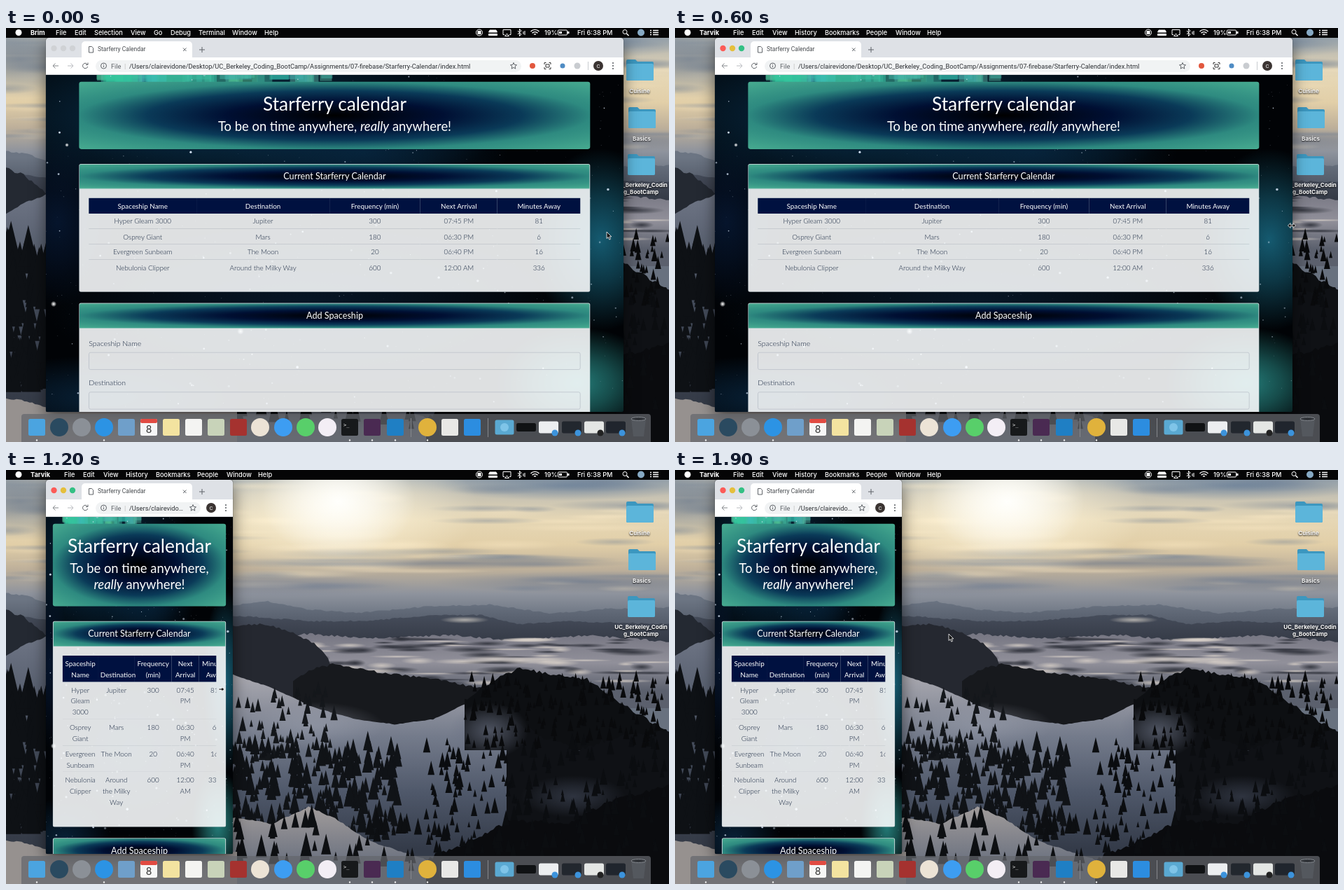
An HTML page with a canvas for the animation above (2 s loop, 947x591 px).

```html
<!DOCTYPE html>
<html lang="en">
<head>
<meta charset="utf-8">
<title>Starferry Calendar</title>
<style>
html, body { margin: 0; width: 100%; height: 100%; overflow: hidden; background: #0b0c0e; }
#stage { position: relative; width: 947px; height: 591px; overflow: hidden; font-family: Roboto, sans-serif; }
#stage > *, #win > *, .abs { position: absolute; }
canvas { display: block; }

#bar { left: 0; top: 0; width: 947px; height: 14px; background: #050506; }
#bar span { position: absolute; top: 0; color: #fff; font: 500 9.2px/13px Inter, sans-serif; white-space: nowrap; }
#bar span:first-child { font-weight: 700; }
.label { width: 90px; text-align: center; color: #fff; font: 700 8px/10px Inter, sans-serif; text-shadow: 0 1px 2px #000; }

#win { left: 57px; top: 14px; height: 534px; overflow: hidden; border-radius: 4px 4px 2px 2px; background: #000; }
#shade { left: 57px; top: 14px; height: 534px; border-radius: 4px; box-shadow: 0 8px 22px rgba(0,0,0,.55), 0 0 1px #000; }
#strip { left: 0; top: 0; width: 100%; height: 28px; background: #dee1e6; }
#tools { left: 0; top: 28px; width: 100%; height: 24px; background: #fff; border-bottom: 1px solid #d5d7da; }
#tab { left: 51px; top: 5px; width: 158px; height: 24px; border-radius: 5px 5px 0 0; background: #fff; }
#tabName { left: 74px; top: 10px; font-size: 8.5px; line-height: 13px; color: #45494d; }
#pill { left: 71px; top: 32px; height: 17px; border-radius: 9px; background: #f1f3f4; }
#url { left: 119px; top: 33px; font-size: 9.25px; line-height: 15px; color: #2c2f33; overflow: hidden; white-space: nowrap; text-overflow: ellipsis; }
#scheme { left: 93px; top: 33px; font-size: 9.25px; line-height: 15px; color: #5f6368; }

#view { left: 0; top: 53px; width: 100%; height: 481px; overflow: hidden; }
#page { position: absolute; left: 0; top: 0; transform-origin: 0 0; font: 300 16px/24px Lato, sans-serif; color: #17263f; }
#box { margin: 0 auto; padding-top: 15px; }
.jumbo, .card h2 { background: radial-gradient(#000 0%, #000f33 30%, #0a3a58 52%, #2e8a80 71%, #47ab90 100%); color: #fff; text-align: center; font-weight: 400; }
.jumbo { padding: 24px 16px; margin-bottom: 32px; border-radius: 5px; }
.jumbo h1 { font: 400 40px/48px Lato, sans-serif; margin: 0 0 8px; }
.jumbo h3 { font: 400 28px/33.6px Lato, sans-serif; margin: 0 0 8px; }
.card { margin-bottom: 24px; border: 1px solid rgba(200,210,215,.8); border-radius: 4px; overflow: hidden; background: rgba(250,252,253,.89); }
.card h2 { margin: 0; padding: 12px; font-size: 19.2px; line-height: 28.8px; border-bottom: 1px solid rgba(190,215,215,.6); }
.body { padding: 20px; }
.scroll { position: relative; overflow: hidden; padding-bottom: 16px; }
table { table-layout: fixed; border-collapse: collapse; font-size: 15px; text-align: center; }
th, td { padding: 4.7px 4.6px; vertical-align: bottom; }
td { vertical-align: top; box-shadow: inset 0 -1px rgba(120,135,150,.3); }
tr:last-child td { box-shadow: none; }
th { background: #001140; color: #fff; font-weight: 400; }
tr.hover td { background: rgba(0,0,0,.1); }
#thumbX { position: absolute; left: 3px; bottom: 1px; width: 308px; height: 6px; border-radius: 4px; background: #777; }
label { display: block; margin-bottom: 8px; }
.field { height: 36px; margin-bottom: 16px; border: 1px solid #b4bbc4; border-radius: 4px; }
#track { right: 0; top: 53px; width: 11px; height: 481px; background: rgba(240,240,240,.75); }
#thumbY { position: absolute; left: 4px; width: 6px; height: 352px; border-radius: 3px; background: #7b7b7b; }
#dock { left: 22px; top: 551px; width: 899px; height: 42px; border-radius: 4px 4px 0 0; background: rgba(100,103,109,.72); }
</style>
</head>
<body>
<div id="stage">
  <canvas id="land" width="947" height="591"></canvas>
  <svg id="folders" width="947" height="591"></svg>
  <div class="label" style="left:860px;top:85px">Cuisine</div>
  <div class="label" style="left:863px;top:153px">Basics</div>
  <div class="label" style="left:862px;top:219px">UC_Berkeley_Codin<br>g_BootCamp</div>

  <div id="shade"></div>
  <div id="win">
    <div id="strip"></div><div id="tab"></div><div id="tools"></div><div id="pill"></div>
    <svg width="240" height="53" fill="none" stroke="#5f6368">
      <g id="lights" stroke="none"><circle cx="11.500" cy="15" r="4.200"/><circle cx="25" cy="15" r="4.200"/><circle cx="38" cy="15" r="4.200"/></g>
      <path d="M61.500 12.500h4l2 2v6.500h-6zM196 14.500l4.500 4.500m0-4.500l-4.500 4.500M219 17h8m-4-4v8"/>
      <path d="M18 40h-8m3.500-3.500L10 40l3.500 3.500" stroke="#85898d"/>
      <path d="M31 40h8m-3.500-3.500L39 40l-3.500 3.500" stroke="#b9bcc0"/>
      <path d="M59 37.500a3.700 3.700 0 1 0 .8 3.500M60 35.500v3h-3"/>
      <circle cx="82.500" cy="40" r="4"/><path d="M82.500 39.500v2.500m0-4.500v1"/>
    </svg>
    <div id="tabName">Starferry Calendar</div>
    <div id="scheme">File&nbsp; <span style="color:#bbb">|</span></div>
    <div id="url">/Users/clairevidone/Desktop/UC_Berkeley_Coding_BootCamp/Assignments/07-firebase/Starferry-Calendar/index.html</div>
    <svg id="actions" width="170" height="24" style="top:28px;right:0">
      <g id="star"><path d="M0-4.500L1.300-1.500 4.500-1.200 2.100.9 2.800 4.100 0 2.400-2.800 4.100-2.100.9-4.500-1.200-1.300-1.500z" fill="none" stroke="#5f6368"/></g>
      <g id="extras">
        <circle cx="40" cy="12" r="4" fill="#e2583e"/>
        <path d="M57 10V7.500h2.500m4 0H66V10m0 4v2.500h-2.500m-4 0H57V14M59 10h5v4h-5z" fill="none" stroke="#333"/>
        <circle cx="83" cy="12" r="3.500" fill="#4f8cc4"/><circle cx="104" cy="12" r="4.500" fill="#c9ccd0"/>
        <path d="M119.500 6v12" stroke="#c8cbcf"/>
      </g>
      <g id="user"><circle r="7" fill="#3b3432"/><text y="2.700" font-size="7.500" fill="#fff" text-anchor="middle">C</text>
        <g fill="#5f6368"><circle cx="21" cy="-4" r="1.100"/><circle cx="21" r="1.100"/><circle cx="21" cy="4" r="1.100"/></g></g>
    </svg>
    <div id="view">
      <canvas id="space" width="826" height="481"></canvas>
      <div id="page"><div id="box">
        <div class="jumbo"><h1>Starferry calendar</h1><h3>To be on time anywhere, <i>really</i> anywhere!</h3></div>
        <div class="card"><h2>Current Starferry Calendar</h2><div class="body"><div class="scroll"><table id="table"></table><div id="thumbX"></div></div></div></div>
        <div class="card"><h2>Add Spaceship</h2><div class="body">
          <label>Spaceship Name</label><div class="field"></div>
          <label>Destination</label><div class="field"></div>
          <label>First spaceship departure (HH:mm - military time)</label><div class="field"></div>
          <label>Frequency (min)</label><div class="field"></div>
        </div></div>
      </div></div>
    </div>
    <div id="track"><div id="thumbY"></div></div>
  </div>

  <div id="bar"><div id="menu"></div>
    <svg class="abs" width="947" height="14" fill="none" stroke="#fff">
      <circle cx="18" cy="6.500" r="4.500" fill="#fff" stroke="none"/>
      <circle cx="676" cy="6.500" r="4.500"/><rect x="674" y="4.500" width="4" height="4" fill="#fff"/>
      <path d="M691 3h9l1.500 3h-12zM689.500 8.500h12v2h-12z" fill="#fff"/>
      <path d="M712 9.500h-2v-7h11v7h-2M712.500 11.500l3-3.500 3 3.500z"/>
      <path d="M731 4l5 5-2.500 2.500v-10L736 4l-5 5M739 5v4M741 4v6"/>
      <path d="M749.500 5a8 8 0 0 1 12 0M751.500 7.300a5.500 5.500 0 0 1 8 0M754 9.300a2.500 2.500 0 0 1 3 0" stroke-width="1.300"/>
      <rect x="788.500" y="3" width="13" height="7" rx="1"/><path d="M790 6.500h4M803 5v3" stroke-width="3"/>
      <circle cx="884" cy="5.500" r="3"/><path d="M886.500 8l3 3" stroke-width="1.500"/>
      <circle cx="907" cy="6.500" r="5" fill="#86a9c4" stroke="none"/>
      <path d="M920 3.500h2m2 0h8M920 6.500h2m2 0h8M920 9.500h2m2 0h8" stroke-width="1.300"/>
    </svg>
    <span style="left:769px;font-weight:500">19%</span><span style="left:816px">Fri 6:38 PM</span>
  </div>
  <div id="dock"></div>
  <svg id="icons" width="947" height="591"></svg>
  <svg id="cursor" width="24" height="24" style="overflow:visible" stroke="#fff" stroke-width=".8">
    <path data-kind="arrow" d="M0 0v9.500l2.200-2 1.600 3.600 1.700-.8-1.600-3.400h3z" fill="#111"/>
    <path data-kind="both" d="M-5.500 0l3.500-3.500v2.500h4v-2.500L5.500 0 2 3.500V1h-4v2.500z" fill="#111"/>
    <path data-kind="east" d="M-4 -1h4v-2L4 0 0 3V1h-4z" fill="#111"/>
  </svg>
</div>
<script>
const $ = id => document.getElementById(id);
const SCALE = 947 / 1440, LEFT = 57, STEP = 100;

function seeded(seed) {
  return () => {
    seed = (seed + 0x6D2B79F5) | 0;
    let v = Math.imul(seed ^ (seed >>> 15), 1 | seed);
    v = (v + Math.imul(v ^ (v >>> 7), 61 | v)) ^ v;
    return ((v ^ (v >>> 14)) >>> 0) / 4294967296;
  };
}

function glow(c, x, y, rx, ry, rgb, alpha) {
  c.save();
  c.translate(x, y);
  c.scale(rx, ry);
  const g = c.createRadialGradient(0, 0, 0, 0, 0, 1);
  g.addColorStop(0, `rgba(${rgb},${alpha})`);
  g.addColorStop(.45, `rgba(${rgb},${alpha * .6})`);
  g.addColorStop(1, `rgba(${rgb},0)`);
  c.fillStyle = g;
  c.fillRect(-1, -1, 2, 2);
  c.restore();
}

function paintLand() {
  const c = $('land').getContext('2d'), rnd = seeded(11);
  const fade = (y0, y1, ...colors) => {
    const g = c.createLinearGradient(0, y0, 0, y1);
    colors.forEach((color, i) => g.addColorStop(i / (colors.length - 1), color));
    return g;
  };
  // Rough skyline through the points, filled down to the floor
  const ridge = (fill, rough, floor, ...pts) => {
    c.fillStyle = fill;
    c.beginPath();
    c.moveTo(pts[0][0], floor);
    pts.forEach(([x, y], i) => {
      const [nx, ny] = pts[i + 1] || [x + 1, y];
      const n = Math.max(1, Math.round((nx - x) / 4));
      for (let k = 0; k < n; k++) c.lineTo(x + (nx - x) * k / n, y + (ny - y) * k / n + (rnd() - .5) * rough);
    });
    c.lineTo(pts[pts.length - 1][0], floor);
    c.fill();
  };
  const forest = (n, x0, x1, y0, y1, h, color) => {
    c.fillStyle = color;
    for (let i = 0; i < n; i++) {
      const x = x0 + rnd() * (x1 - x0), y = y0 + rnd() * (y1 - y0), t = h * (.5 + rnd());
      c.beginPath();
      c.moveTo(x, y - t);
      c.lineTo(x + t * .24, y);
      c.lineTo(x - t * .24, y);
      c.fill();
    }
  };

  c.fillStyle = fade(0, 212, '#8496a9', '#c4c0b2', '#e6d7b5', '#e2cfa8', '#beb09a', '#8e939d', '#68717f');
  c.fillRect(0, 0, 947, 591);
  for (let i = 0; i < 110; i++) {
    const x = rnd() * 947, y = rnd() * 175, dark = rnd() < .55;
    if (dark && Math.abs(x - 470) < 140 && y < 105) continue;
    glow(c, x, y, 30 + rnd() * 90, 3 + rnd() * 6, dark ? '108,124,146' : '252,234,198', .38);
  }
  glow(c, 20, 45, 150, 55, '98,114,136', .7);
  glow(c, 800, 22, 190, 22, '98,122,150', .65);
  glow(c, 640, 133, 260, 9, '108,118,136', .65);
  glow(c, 850, 160, 240, 16, '112,122,140', .6);
  glow(c, 380, 165, 200, 16, '122,130,146', .6);
  glow(c, 465, 55, 210, 100, '255,246,220', .9);
  glow(c, 475, 45, 110, 80, '255,255,252', 1);

  ridge(fade(185, 235, '#6c7583', '#4a515f'), 2, 260, [0, 176], [30, 180], [60, 190], [330, 193], [370, 187], [430, 199], [500, 204], [600, 195], [690, 192], [780, 205], [860, 198], [947, 196]);
  ridge(fade(205, 260, '#464d5b', '#2e333e'), 2, 320, [0, 205], [60, 215], [330, 208], [440, 216], [520, 215], [610, 207], [680, 207], [730, 220], [800, 216], [947, 220]);
  ridge(fade(235, 315, '#777783', '#91909a', '#5b606d'), 3, 340, [330, 240], [430, 234], [520, 240], [640, 236], [720, 243], [830, 236], [947, 245]);
  for (let i = 0; i < 100; i++) {
    const x = 400 + rnd() * 547, y = 240 + rnd() * 65;
    glow(c, x, y, 12 + rnd() * 36, 1.5 + rnd() * 4, rnd() < .5 ? '216,208,200' : '38,41,50', .8);
  }
  glow(c, 655, 214, 35, 5, '220,214,205', .7);
  ridge('#252830', 3, 330, [324, 222], [370, 220], [410, 232], [440, 248], [460, 268], [470, 300]);
  ridge('#17191d', 4, 372, [410, 300], [440, 283], [470, 277], [530, 288], [610, 298], [680, 312], [720, 330]);
  ridge(fade(300, 540, '#a5a5ad', '#747b8b', '#4f586a', '#343b49'), 1, 591, [300, 284], [380, 311], [440, 339], [500, 356], [555, 363], [610, 356], [660, 332], [720, 300], [800, 330], [947, 400]);
  glow(c, 440, 365, 100, 34, '158,163,177', .45);
  ridge('#0d0f12', 5, 400, [655, 328], [690, 305], [730, 283], [770, 290], [830, 299], [880, 334], [947, 375]);
  ridge('#0f1115', 8, 591, [715, 345], [760, 380], [820, 400], [870, 380], [947, 372]);
  glow(c, 690, 372, 56, 40, '105,112,130', .7);
  glow(c, 810, 466, 75, 30, '72,80,98', .55);
  ridge('#0a0b0e', 7, 591, [590, 560], [660, 530], [720, 500], [800, 505], [870, 470], [947, 450]);
  forest(170, 655, 945, 300, 400, 13, '#090a0c');
  forest(190, 600, 947, 390, 560, 16, '#0b0d10');
  forest(80, 330, 470, 320, 420, 15, '#14171b');
  forest(230, 324, 560, 400, 530, 22, '#101317');
  ridge(fade(480, 560, '#a19c9b', '#6c7280'), 2, 591, [324, 496], [380, 505], [432, 481], [470, 497], [520, 530], [600, 556]);
  forest(45, 324, 620, 510, 575, 24, '#0d0f12');

  ridge('#242932', 4, 330, [0, 200], [25, 210], [60, 238]);
  ridge(fade(240, 540, '#6d7484', '#454d5c', '#343a46'), 2, 591, [0, 265], [25, 250], [60, 237]);
  forest(110, -5, 60, 320, 525, 38, '#0e1115');
  ridge('#96918f', 3, 591, [0, 528], [30, 533], [60, 542], [330, 545]);
}

function paintSpace(w) {
  const c = $('space').getContext('2d'), rnd = seeded(5);
  c.fillStyle = '#010306';
  c.fillRect(0, 0, w, 481);
  const cloud = (x, y, rx, ry, rgb, a) => glow(c, x * w, y, rx * w, ry, rgb, a);
  cloud(.3, 60, .5, 130, '10,52,82', .9);
  cloud(.55, 110, .25, 80, '8,42,70', .7);
  cloud(.96, 235, .12, 130, '24,105,130', .85);
  cloud(.92, 440, .14, 80, '42,145,140', .85);
  cloud(.02, 210, .1, 120, '8,28,60', .7);
  cloud(.45, 330, .45, 120, '12,35,60', .6);
  cloud(.1, 460, .25, 60, '10,40,66', .8);
  for (let i = 0; i < 60; i++) {
    c.fillStyle = `rgba(${40 + rnd() * 50},${165 + rnd() * 50},${145 + rnd() * 40},.5)`;
    c.fillRect((.08 + rnd() * .4) * w, 0, 6 + rnd() * .05 * w, 4 + rnd() * 12);
  }
  for (let i = 0; i < 650; i++) {
    const x = rnd() * w, y = rnd() * 481, r = .3 + rnd() ** 5 * 1.5;
    c.fillStyle = `rgba(225,238,255,${.25 + rnd() * .7})`;
    c.beginPath();
    c.arc(x, y, r, 0, 7);
    c.fill();
  }
  [[11, 327, 2.6], [278, 366, 3], [30, 100, 1.8]].forEach(([x, y, r]) => glow(c, x, y, r * 1.6, r * 1.6, '255,255,255', 1));
}

function buildIcons() {
  $('folders').innerHTML = [[886, 45], [889, 113], [888, 180]].map(([x, y]) =>
    `<path d="M${x} ${y + 2}q0-2 2-2h11l3 3h21q2 0 2 2v23q0 2-2 2h-35q-2 0-2-2z" fill="#3c97bf"/><rect x="${x}" y="${y + 6}" width="39" height="24" rx="2" fill="#5cb5da"/>`).join('');
  const square = (x, fill, w = 24, h = 24) => `<rect x="${x - w / 2}" y="${570 - h / 2}" width="${w}" height="${h}" rx="2.500" fill="${fill}"/>`;
  const disc = (x, fill) => `<circle cx="${x}" cy="570" r="13" fill="${fill}"/>`;
  const squares = { 44: '#4ba4e0', 172: '#6f9fca', 204: '#f6f6f6', 236: '#f3e3a0', 268: '#f4f4f2', 300: '#c8d3b9', 332: '#a5322f', 491: '#17191b', 523: '#4a2a52', 556: '#1f7fc4', 634: '#e8e8e6', 666: '#2c8de0' };
  const discs = { 76: '#2a4a60', 108: '#8b9097', 140: '#2c93e4', 363: '#ece3d6', 396: '#3d9df2', 428: '#58cf6a', 459: '#f3eef5', 602: '#e0b23c' };
  let art = Object.entries(squares).map(([x, f]) => square(+x, f)).join('') + Object.entries(discs).map(([x, f]) => disc(+x, f)).join('');
  art += '<rect x="192" y="558" width="24" height="6" rx="2" fill="#e14b42"/><text x="204" y="578" font-size="14" fill="#333" text-anchor="middle" font-family="Inter, sans-serif">8</text>';
  art += '<text x="482" y="569" font-size="7" fill="#eee" font-family="DejaVu Sans Mono, monospace">&gt;_</text>';
  art += '<path d="M578.500 557v27M688.500 557v27" stroke="#85888d"/>';
  art += square(712, '#5aa9d2', 27, 21) + disc(712, '#7fc4e8').replace('13', '6');
  [[743, '#101214'], [775, '#eceef0'], [808, '#22272e'], [840, '#e4e6e4'], [871, '#20252d']].forEach(([x, f], i) => {
    art += square(x, f, 28, i ? 17 : 12);
    if (i) art += `<circle cx="${x + 9}" cy="578" r="4.500" fill="${i === 3 ? '#222' : '#3c93dc'}"/>`;
  });
  art += '<path d="M893 558h21l-3 25h-15z" fill="#54585e"/><ellipse cx="903.500" cy="558" rx="10.500" ry="2.500" fill="#303338" stroke="#83878d"/>';
  [44, 140, 491, 523, 556, 602].forEach(x => art += `<circle cx="${x}" cy="588.500" r="1.200" fill="#eee"/>`);
  $('icons').innerHTML = art;
}

const ROWS = [
  ['Spaceship Name', 'Destination', 'Frequency (min)', 'Next Arrival', 'Minutes Away'],
  ['Hyper Gleam 3000', 'Jupiter', 300, '07:45 PM', 81],
  ['Osprey Giant', 'Mars', 180, '06:30 PM', 6],
  ['Evergreen Sunbeam', 'The Moon', 20, '06:40 PM', 16],
  ['Nebulonia Clipper', 'Around the Milky Way', 600, '12:00 AM', 336]
];
const COLUMNS = [
  [239, [51, 52, 53, 39, 44]],
  [427, [94, 114, 82, 62, 75]],
  [703, [154, 190, 130, 110, 119]]
];
const MENUS = {
  editor: [['Brim', 35], ['File', 71], ['Edit', 98], ['Selection', 126], ['View', 178], ['Go', 211], ['Debug', 235], ['Terminal', 275], ['Window', 323], ['Help', 369]],
  browser: [['Tarvik', 35], ['File', 83], ['Edit', 110], ['View', 139], ['History', 171], ['Bookmarks', 214], ['People', 273], ['Window', 315], ['Help', 360]]
};
// Window right edge, page scroll, pointer x, pointer y, table scroll
const POSES = [
  [882, 0, 858, 291, 0], [882, 30, 861, 289, 0], [882, 60, 864, 288, 0], [882, 44, 867, 286, 0],
  [882, 20, 872, 285, 0], [882, 0, 877, 283, 0], [882, 0, 881, 282, 0], [770, 0, 752, 290, 0],
  [654, 0, 631, 297, 0], [565, 0, 545, 301, 0], [470, 0, 450, 306, 0], [385, 0, 365, 310, 0],
  [324, 0, 308, 313, 0], [324, 0, 290, 340, 0], [324, 0, 264, 376, 10], [324, 0, 257, 388, 6],
  [324, 0, 256, 390, 0], [324, 0, 302, 336, 0], [324, 0, 356, 268, 0], [324, 0, 391, 234, 0]
];

$('table').innerHTML = '<colgroup>' + '<col>'.repeat(5) + '</colgroup>' + ROWS.map((row, i) =>
  '<tr>' + row.map(cell => i ? `<td>${cell}</td>` : `<th>${cell}</th>`).join('') + '</tr>').join('');
const cols = [...document.querySelectorAll('col')];
const cursors = [...$('cursor').children];

function columnWidths(width) {
  const i = width < COLUMNS[1][0] ? 0 : 1;
  const [[w0, a], [w1, b]] = COLUMNS.slice(i, i + 2);
  const k = (width - w0) / (w1 - w0);
  return a.map((v, n) => v + (b[n] - v) * k);
}

function resize(width) {
  const css = width / SCALE, px = v => v + 'px';
  const container = css >= 1200 ? 1140 : css >= 992 ? 960 : css >= 768 ? 720 : css >= 576 ? 540 : css;
  const inner = (container - 30 - 42) * SCALE, tableWidth = Math.max(239, Math.min(703, inner));
  const small = width < 300;
  $('win').style.width = $('shade').style.width = px(width);
  $('page').style.width = px(css);
  $('box').style.width = px(container - 30);
  $('table').style.width = px(tableWidth / SCALE);
  columnWidths(tableWidth).forEach((w, i) => cols[i].style.width = px(w / SCALE));
  const starX = small ? 113 : 13;
  $('star').setAttribute('transform', `translate(${starX} 12)`);
  $('user').setAttribute('transform', `translate(${small ? 139 : 134} 12)`);
  $('extras').style.display = small ? 'none' : '';
  const starLeft = width - 170 + starX;
  $('url').style.width = px(starLeft - 119 - 13);
  $('pill').style.width = px(starLeft - 71 + 11);
  paintSpace(width);
}

function show(step) {
  const [right, scroll, x, y, shift] = POSES[step];
  const active = step >= 6;
  resize(right - LEFT);
  $('page').style.transform = `translateY(${-scroll}px) scale(${SCALE})`;
  $('track').style.display = step > 0 && step < 5 ? '' : 'none';
  $('thumbY').style.top = scroll * 481 / 657 + 1 + 'px';
  $('table').style.transform = `translateX(${-shift / SCALE}px)`;
  const hover = step >= 14 && step <= 16;
  $('thumbX').style.display = hover ? '' : 'none';
  $('thumbX').style.transform = `translateX(${shift}px)`;
  $('table').rows[2].className = hover ? 'hover' : '';
  $('menu').innerHTML = MENUS[active ? 'browser' : 'editor'].map(([name, left]) => `<span style="left:${left}px">${name}</span>`).join('');
  const lights = active ? ['#fc5b57', '#e5bf3c', '#34c084'] : ['#d0d2d5', '#d0d2d5', '#d0d2d5'];
  [...$('lights').children].forEach((dot, i) => dot.setAttribute('fill', lights[i]));
  const kind = step < 6 || step > 12 ? 'arrow' : step === 12 ? 'east' : 'both';
  cursors.forEach(shape => shape.style.display = shape.dataset.kind === kind ? '' : 'none');
  $('cursor').style.transform = `translate(${x}px,${y}px)`;
}

paintLand();
buildIcons();
$('cursor').style.left = $('cursor').style.top = 0;
const start = performance.now();
let current = -1;
function tick() {
  const step = Math.floor((performance.now() - start) / STEP) % POSES.length;
  if (step !== current) show(current = step);
  requestAnimationFrame(tick);
}
tick();
</script>
</body>
</html>
```
